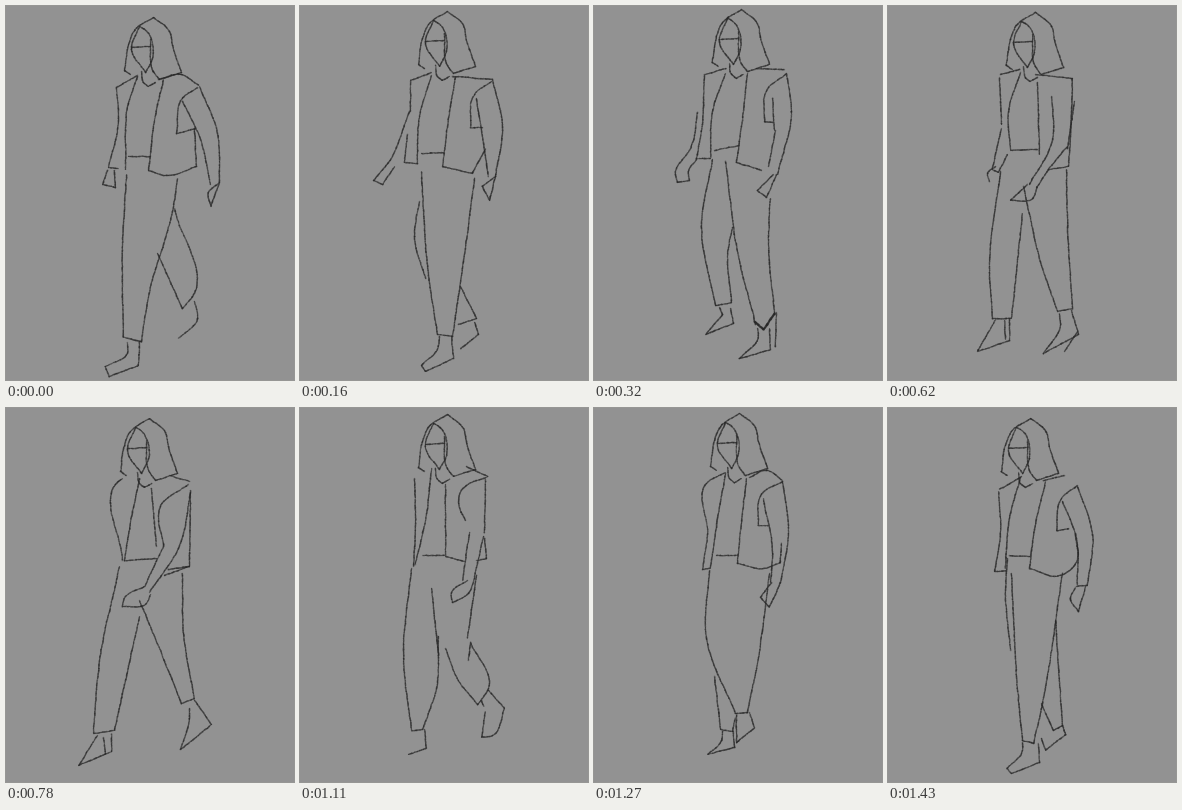
Animation of 288 by 374 pixels, one loop 1580 ms. Source, as an HTML page with a canvas:

```html
<!DOCTYPE html>
<html lang="en">
<head>
<meta charset="utf-8">
<title>Walk cycle</title>
<style>
html, body { margin: 0; width: 100%; height: 100%; overflow: hidden; background: #929292; }
canvas { display: block; }
</style>
</head>
<body>
<canvas id="stage" width="288" height="374"></canvas>
<script>
// Strokes are "x,y" points; ";" lifts the pencil.
// The head is shared by all poses and measured from its crown.
const head = `-23,57 -29,53 -25,27 -19,13 0,0 16,14 19,28 28,55 6,62;
  -14,9 -22,32 -8,55 -1,40 -10,11 -14,9; -22,30 -3,29;
  -12,54 -10,65 -5,69 2,65; -3,22 0,54 6,62`;

const poses = [];
const pose = (ms, x, y, lines, bold) => poses.push({ ms, x, y, lines, bold });

pose(160, 147, 11, `131,69 110,81 112,115 102,161 112,162; 131,70 122,97 119,163;
  157,73 148,115 142,164 160,169 190,160 188,122; 152,73 174,68 192,79;
  191,81 176,92 170,127 189,122; 122,150 144,150;
  101,164 96,178 109,181 108,164; 193,80 211,126 213,176; 176,95 193,130 204,178;
  213,176 202,186 204,200 213,177;
  120,168 116,240 117,331 135,335 142,290 167,200 171,172;
  168,202 186,290 176,302 151,247; 188,295 191,312 172,332;
  121,336 121,346 99,360 103,370 132,359 133,335`);

pose(160, 147, 5, `131,66 110,74 110,105; 131,69 119,110 117,157 104,156 107,128;
  155,70 148,113 142,160 172,167 185,142; 152,70 192,73;
  191,75 174,88 170,121 182,121; 121,147 144,146;
  109,105 88,156 73,174 82,178 94,160; 192,73 202,120 195,170;
  176,92 188,170; 195,170 182,180 189,194 195,170;
  121,165 127,260 137,328 152,330 163,255 174,172;
  119,195 114,230 125,272; 160,280 176,312 158,318; 174,316 178,328 160,342;
  139,330 138,340 121,359 125,365 153,352 151,330`);

pose(300, 147, 3, `111,68 131,62; 110,68 107,125 102,152 116,152; 131,67 118,105 116,151;
  153,67 145,135 142,156 167,164; 162,62 190,63;
  192,67 172,84 170,115 178,116; 178,92 180,124; 120,144 144,139;
  103,106 97,140 81,168 83,176 95,174 94,165 102,153;
  192,67 197,105 183,168; 181,124 174,160; 179,168 163,184 172,191 182,168;
  118,153 107,220 121,299 137,296 134,240 138,221;
  131,155 143,245 161,318; 176,192 174,230 180,308;
  125,301 128,308 111,328 139,317 136,302;
  163,322 164,329 145,352 176,343 175,322; 182,306 181,340`,
  `160,315 169,323 180,307`);

pose(160, 147, 6, `112,68 131,63; 111,71 113,118; 132,66 120,105 122,144 149,143;
  149,76 151,148; 147,68 184,72 182,130 180,160 160,163; 186,95 179,142;
  113,122 104,162; 107,160 99,167 101,175; 104,163 110,166 119,148;
  163,90 164,133 141,178; 179,140 160,163 148,181; 139,178 122,194 144,192 149,180;
  112,165 101,260 104,312 123,312 134,207;
  135,180 152,255 169,305 184,302 179,220 178,163;
  107,313 89,345 121,334 121,312; 116,314 117,333;
  171,307 172,318 155,347 190,328 183,304; 189,325 176,345`);

pose(330, 143, 10, `163,67 183,73; 116,70 112,73 116,152; 133,70 123,120 118,152 150,150;
  145,80 150,138; 182,76 154,98 157,138; 184,82 183,158 162,161; 158,167 183,158;
  184,84 174,135 143,184; 157,138 138,178; 138,178 118,190 116,198 140,195 144,186;
  113,158 92,260 87,325 108,322 133,208;
  133,192 155,245 175,295 188,290 177,225 176,165;
  91,327 72,357 105,343 105,326; 97,329 99,345;
  183,300 183,310 174,341 205,316 188,292`);

pose(160, 147, 6, `114,70 115,115 113,158; 131,60 126,105 115,156;
  166,58 187,68 161,82 158,95 165,112; 145,76 145,148 164,153;
  184,130 186,150 176,152; 122,147 144,147;
  185,70 184,124; 183,128 174,170; 169,124 162,172;
  167,172 151,185 152,194 168,185 174,170;
  111,160 103,250 111,322 122,321 136,280 138,228; 131,180 138,247;
  145,240 158,272 177,296 188,280 170,234 168,252; 176,167 167,230;
  124,321 126,340 108,346; 181,292 183,298; 188,282 204,300 192,327 181,329 185,303`);

pose(160, 145, 5, `131,64 112,75 113,125 108,161 116,160; 131,65 124,105 116,159;
  152,70 147,112 143,155 170,160 186,154 187,135; 155,69 172,62 188,72;
  188,73 167,86 164,117 174,117; 122,147 143,147;
  188,73 194,125 186,174; 169,90 178,145 176,174; 177,174 166,189 175,199 186,174;
  115,162 112,230 141,305 153,304 162,260 175,165;
  120,268 126,321 138,323 141,309; 142,306 142,334 160,319 155,304;
  128,323 127,332 113,346 140,339 139,323`);

pose(150, 142, 10, `133,68 111,81; 110,83 112,125 106,163 117,162; 132,69 121,110 117,160;
  157,73 147,115 141,160 172,167 187,156 187,125; 155,72 176,67;
  189,77 173,90 168,122 180,120; 121,147 142,148;
  189,78 204,126 199,177 188,178; 174,93 188,130 189,176; 187,179 182,190 190,203 197,178;
  119,150 117,185 122,242; 123,165 129,280 134,332 145,335 153,300 174,165;
  167,212 174,317 165,322 153,295;
  134,334 134,342 118,360 123,365 151,354 150,335;
  174,317 177,326 157,342 153,330`);

const loop = poses.reduce((sum, p) => sum + p.ms, 0);
const ctx = document.getElementById('stage').getContext('2d');

function seeded(seed) {
  return () => {
    seed = (seed * 16807) % 2147483647;
    return seed / 2147483647;
  };
}

const gap = (a, b) => Math.hypot(b[0] - a[0], b[1] - a[1]) || 1;
const unit = (a, b) => [(b[0] - a[0]) / gap(a, b), (b[1] - a[1]) / gap(a, b)];

// Smooth through gentle bends, stay sharp at corners and ends.
function tangent(pts, i, dir) {
  if (i === 0 || i === pts.length - 1) return dir;
  const [p, q, r] = pts.slice(i - 1, i + 2);
  const a = unit(p, q), b = unit(q, r);
  if (a[0] * b[0] + a[1] * b[1] < 0.45) return dir;
  const m = gap(q, r), n = gap(p, q);
  return unit([0, 0], [a[0] * m + b[0] * n, a[1] * m + b[1] * n]);
}

function stroke(pts, size, rnd) {
  let dx = 0, dy = 0;
  for (let i = 0; i < pts.length - 1; i++) {
    const p = pts[i], q = pts[i + 1], dir = unit(p, q), len = gap(p, q);
    const s = tangent(pts, i, dir), e = tangent(pts, i + 1, dir);
    const steps = Math.ceil(len / 0.6);
    for (let k = 0; k <= steps; k++) {
      const t = k / steps, u = 1 - t;
      const at = c => u * u * u * p[c] + 3 * u * u * t * (p[c] + s[c] * len / 3) +
        3 * u * t * t * (q[c] - e[c] * len / 3) + t * t * t * q[c];
      dx = dx * 0.85 + (rnd() - 0.5) * 0.3;
      dy = dy * 0.85 + (rnd() - 0.5) * 0.3;
      ctx.globalAlpha = 0.3 + rnd() * 0.4;
      ctx.beginPath();
      ctx.arc(at(0) + dx + 0.5, at(1) + dy + 0.5, size * (0.75 + rnd() * 0.4), 0, Math.PI * 2);
      ctx.fill();
    }
  }
}

function sketch(lines, size, rnd, x = 0, y = 0) {
  for (const line of lines.split(';')) {
    const pts = line.trim().split(/\s+/).map(p => p.split(',').map(Number));
    stroke(pts.map(p => [p[0] + x, p[1] + y]), size, rnd);
  }
}

function draw(n) {
  const { x, y, lines, bold } = poses[n];
  const rnd = seeded(71 + n * 997);
  ctx.globalAlpha = 1;
  ctx.fillStyle = '#929292';
  ctx.fillRect(0, 0, 288, 374);
  ctx.fillStyle = '#262626';
  sketch(head, 0.8, rnd, x, y);
  sketch(lines, 0.8, rnd);
  if (bold) sketch(bold, 1.2, rnd);
}

let shown = -1;
function tick(now) {
  let t = now % loop, n = 0;
  while (t >= poses[n].ms) t -= poses[n++].ms;
  if (n !== shown) draw(shown = n);
  requestAnimationFrame(tick);
}
tick(0);
</script>
</body>
</html>
```
